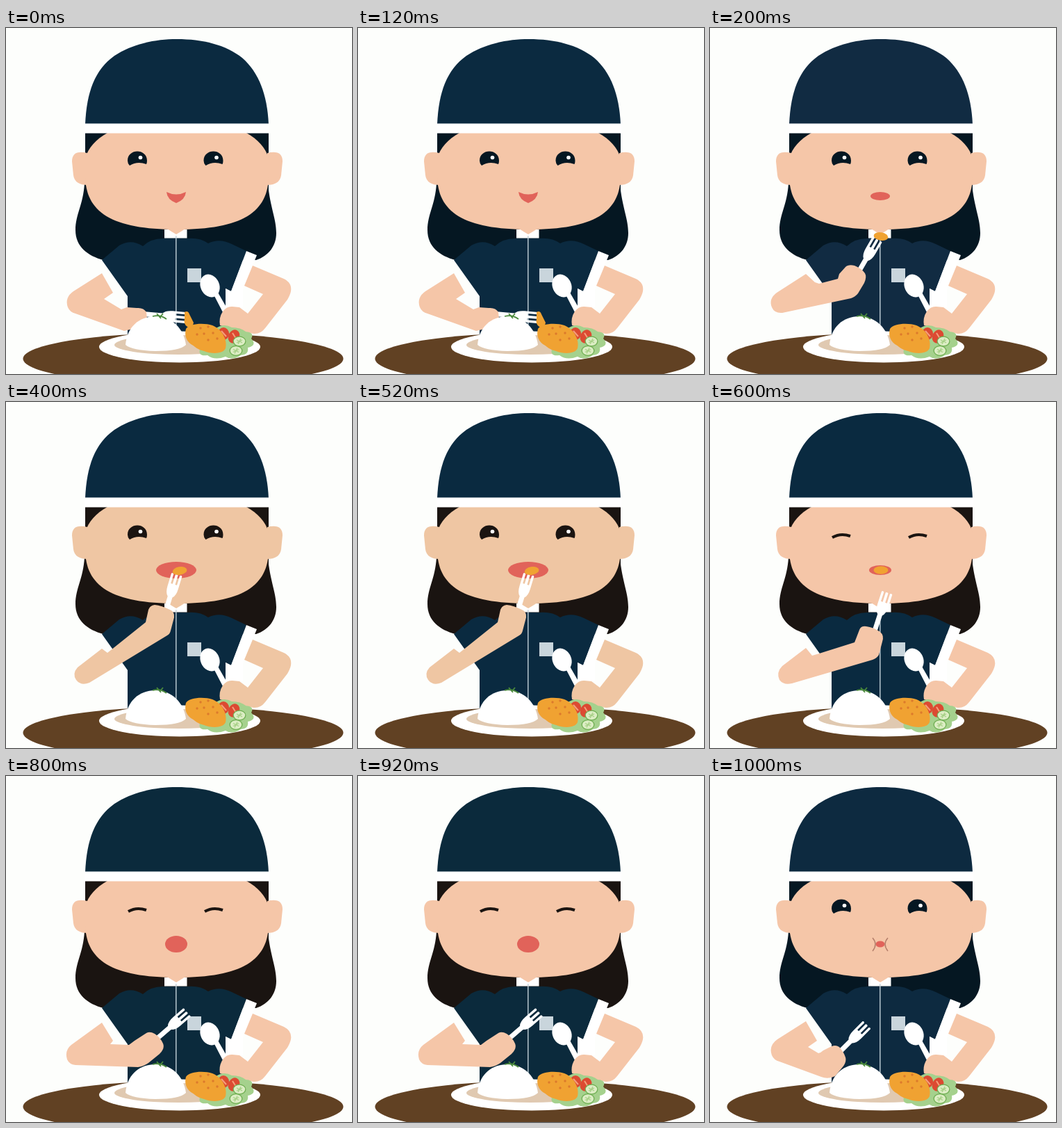
Animation of 498x498 px, one loop 1.2 s. Source, as an HTML page:

```html
<!DOCTYPE html>
<html lang="en">
<head>
<meta charset="utf-8">
<title>Lunch time</title>
<style>
  html, body { margin: 0; width: 100%; height: 100%; overflow: hidden; background: #fdfefc; }
  svg { display: block; width: 100%; height: 100%; }
  .navy { fill: var(--navy); }
  .hair { fill: var(--hair); }
  .skin { fill: var(--skin); }
  .white { fill: #fff; }
  .red { fill: #e1635a; }
  .orange { fill: #f0a232; }
  .lid { fill: none; stroke: var(--hair); stroke-width: 4; }
  .hidden { display: none; }
</style>
</head>
<body>
<svg id="stage" viewBox="0 0 498 498">
  <defs>
    <g id="eye">
      <path class="hair" d="M-14 3C-14 -15 14 -15 14 3Q14 6 13 8Q0 3 -11 10Q-14 7 -14 3Z"/>
      <circle class="white" cx="4.500" cy="-1.500" r="2.800"/>
    </g>
    <path id="lid" class="lid" d="M-13 7Q-1 0 13 5"/>
    <g id="cucumber">
      <ellipse rx="9.500" ry="7.500" fill="#6fae52"/>
      <ellipse rx="8.200" ry="6.200" fill="#dcedc4"/>
      <path d="M-4 -2L4 2M-2 4L2 -4M-4 2L4 -2" stroke="#a5cf84" stroke-width="1.300"/>
    </g>
  </defs>

  <path class="hair" d="M113 224C111 255 100 268 100 291C100 315 118 328 140 334H360C378 328 389 314 389 295C389 274 380 258 377 224Z"/>
  <rect class="hair" x="114" y="148" width="264" height="90"/>
  <g class="skin">
    <path d="M117 180Q95 175 95 192L97 212Q99 226 118 226Z"/>
    <path d="M376 180Q398 175 398 192L396 212Q394 226 375 226Z"/>
    <path d="M146 151C130 160 118 172 114 188V212C114 265 152 290 246 290C340 290 378 265 378 212V188C374 172 362 160 346 151Z"/>
  </g>
  <path class="navy" d="M114 138.500C116 92 128 60 156 40C182 23 214 16 246 16C283 16 316 24 340 43C364 64 376 96 378 138.500Z"/>
  <rect class="white" x="113" y="137.500" width="266" height="14"/>

  <path class="navy" d="M138 334L163 313Q180 303 197 314Q209 302 229 303H260Q279 301 291 310Q307 302 325 311L346 321L324 379L316 375V450H175V386Z"/>
  <path class="white" d="M346 321L361 327L341 376L341 402H316V375L324 379Z"/>
  <rect class="white" x="228" y="290" width="32.500" height="12.500"/>
  <path class="skin" d="M232 289H258Q252 293 245 297Q238 293 232 289Z"/>
  <path d="M244.800 299V435" stroke="#c3d1d9" stroke-width="1.400"/>
  <rect x="261" y="346" width="20" height="20" fill="#c9d5dc"/>

  <g id="open"><use href="#eye" x="189" y="188"/><use href="#eye" x="298.500" y="188"/></g>
  <g id="shut"><use href="#lid" x="189" y="188"/><use href="#lid" x="299" y="188"/></g>
  <path id="smile" class="red" d="M231 236Q245 243 259 236Q258 247 245 252Q232 247 231 236Z"/>
  <ellipse id="mouth" class="red" cx="245" cy="242"/>
  <path id="cheeks" d="M234 233Q242 242 234 252M256 233Q248 242 256 252" fill="none" stroke="#b5806c" stroke-width="1.500"/>

  <ellipse cx="255" cy="476" rx="230.500" ry="37" fill="#614123"/>
  <path class="white" d="M298 382L304 379L319 405L312 409Z"/>
  <ellipse class="white" cx="293.500" cy="371" rx="13.500" ry="17" transform="rotate(-24 293.500 371)"/>
  <path class="skin" d="M355 342L400 361Q412 367 410 379Q409 384 405 391L373 432Q366 441 356 440L308 428Q306 417 312 408Q318 400 326 401L336 402L348 411L370 383L343 371Z"/>

  <path id="fork" class="white" d="M-8 1V20Q-8 30 -3.500 34V62H3.500V34Q8 30 8 20V1Q6.500 -1 4.600 1V15H1.900V1Q0 -1 -1.900 1V15H-4.600V1Q-6.500 -1 -8 1Z"/>
  <path id="arm" class="skin"/>

  <ellipse class="white" cx="250" cy="459" rx="116" ry="22.500"/>
  <ellipse cx="248" cy="456" rx="92" ry="14" fill="#e0c9b1"/>
  <path class="white" d="M172 456C174 431 191 415 215 415C239 415 256 433 259 456Q250 465 215 465Q181 464 172 456Z"/>
  <path d="M211 415Q222 412 231 419M217 411L223 418M226 411L221 417" fill="none" stroke="#4b8a3c" stroke-width="1.800"/>
  <path d="M300 434Q312 424 325 431Q338 431 345 437Q358 438 353 447Q362 457 348 460Q350 470 338 471Q326 479 316 473Q300 479 290 471Q276 473 279 462Z" fill="#a5d18d"/>
  <g fill="#dc4a32">
    <ellipse cx="313" cy="440" rx="8" ry="9"/>
    <ellipse cx="328" cy="444" rx="8" ry="10" transform="rotate(25 328 444)"/>
  </g>
  <path d="M310 436L317 444M326 439L331 447" stroke="#f3a07c" stroke-width="2"/>
  <use href="#cucumber" x="336" y="451"/>
  <use href="#cucumber" x="331" y="464.500"/>
  <path class="orange" d="M259 433C264 425 285 424 297 428C312 434 319 450 316 461C312 470 295 469 285 465C275 463 272 458 266 455C258 449 257 440 259 433Z"/>
  <g id="spice" fill="#dc7a2c"></g>
  <path id="drumstick" class="orange" d="M257 409Q262 406 264 412L270 424Q269 432 261 430Q255 426 257 419Z"/>
  <ellipse id="bite" class="orange" rx="10.500" ry="5.800"/>
</svg>
<script>
const STEP = 200;
const DARK = '#051722', WARM = '#1a1411';
const PEACH = '#f5c6a8', TAN = '#efc6a3';
const ELBOW = 'M138 353L97 379Q84 388 89 402Q92 409 100 411';

// colors: navy, hair, skin; fork: tip x, tip y, angle; mouth: radii; bite: x, y, angle
const poses = [
  { colors: ['#0b2a40', DARK, PEACH], fork: [259, 417, 95], smile: true, drumstick: true,
    arm: ELBOW + 'L170 436L204 428L202 409Q198 402 188 403L174 402L166 405L141 390L154 381Z' },
  { colors: ['#112b42', DARK, PEACH], fork: [241, 304, 30], mouth: [14, 6], bite: [246, 300, 10],
    arm: 'M138 354L96 381Q84 390 89 402Q93 411 104 410L203 389Q209 387 213 382L222 367Q226 358 223 353Q218 346 208 342Q199 340 195 344L186 354L184 361L157 368L151 366Z' },
  { colors: ['#0a2a40', WARM, TAN], fork: [246, 248, 17], mouth: [29, 12], bite: [250, 243, -10],
    arm: 'M138 355L103 382Q95 391 101 400Q108 409 120 404L232 336Q236 334 237 329L242 310Q243 302 236 299Q224 293 214 292Q207 293 205 299L201 317L146 361Z' },
  { colors: ['#0a2a40', WARM, PEACH], fork: [255, 274, 18], mouth: [16, 7], bite: [246, 242, 0], shut: true,
    arm: 'M138 354L104 380Q95 389 100 400Q106 408 118 405L234 371Q240 369 243 364L248 345Q251 336 245 331Q235 324 225 323Q217 322 215 328L210 341L208 346L154 363L147 365Z' },
  { colors: ['#0b2a3c', WARM, PEACH], fork: [261, 340, 49], mouth: [16, 12], shut: true,
    arm: 'M138 355L94 387Q84 395 88 408Q91 415 100 416L190 419Q198 418 205 413L221 400Q229 392 226 385Q222 376 214 371Q207 367 202 370L185 381L177 387L150 386L154 381Z' },
  { colors: ['#0d2a40', DARK, PEACH], fork: [226, 358, 45], mouth: [6.5, 4.5], cheeks: true,
    arm: ELBOW + 'L160 433Q170 437 180 432L190 420Q197 412 195 405Q193 398 186 390Q180 386 173 390L163 395Q160 398 156 399L141 390L154 381Z' }
];

const el = id => document.getElementById(id);
const show = (id, on) => el(id).classList.toggle('hidden', !on);
const place = (id, [x, y, turn]) =>
  el(id).setAttribute('transform', `translate(${x} ${y}) rotate(${turn})`);

el('spice').innerHTML = [[280, 432], [291, 430], [285, 440], [298, 439], [291, 449], [304, 447], [275, 441]]
  .map(([x, y]) => `<circle cx="${x}" cy="${y}" r="1.7"/>`).join('');

function draw(pose) {
  ['navy', 'hair', 'skin'].forEach((name, i) =>
    el('stage').style.setProperty('--' + name, pose.colors[i]));
  el('arm').setAttribute('d', pose.arm);
  place('fork', pose.fork);
  show('open', !pose.shut);
  for (const id of ['shut', 'smile', 'mouth', 'cheeks', 'drumstick', 'bite']) show(id, pose[id]);
  if (pose.bite) place('bite', pose.bite);
  if (pose.mouth) {
    el('mouth').setAttribute('rx', pose.mouth[0]);
    el('mouth').setAttribute('ry', pose.mouth[1]);
  }
}

const start = performance.now();
let current = 0;
draw(poses[0]);

function tick() {
  const next = Math.floor((performance.now() - start) / STEP) % poses.length;
  if (next !== current) draw(poses[current = next]);
  requestAnimationFrame(tick);
}
requestAnimationFrame(tick);
</script>
</body>
</html>
```
